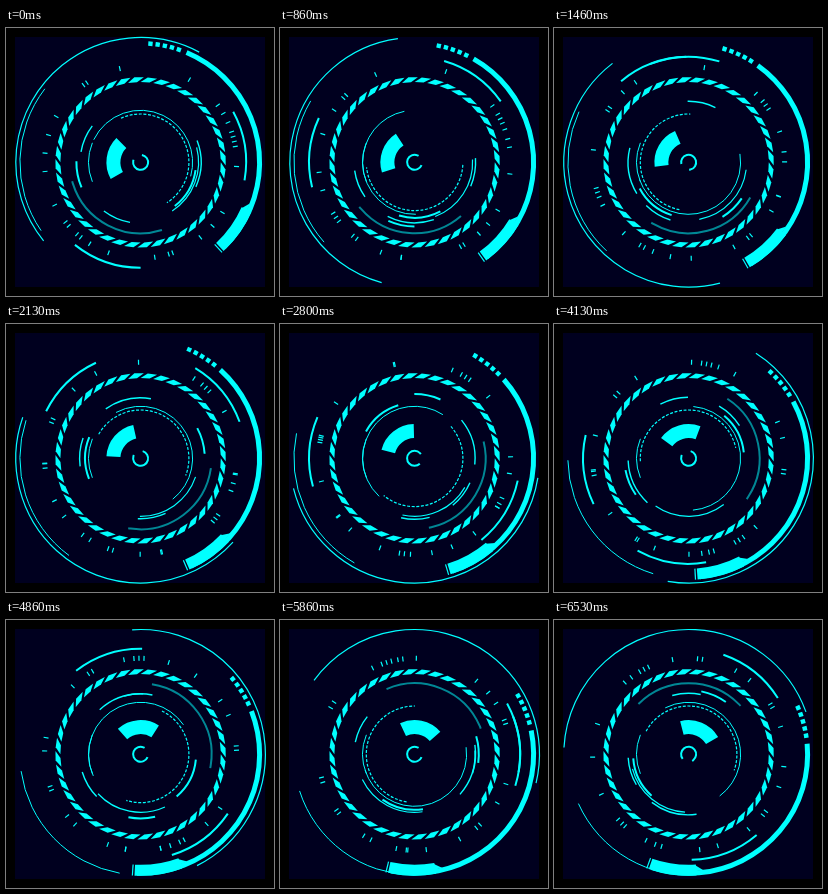
Write an HTML page with a canvas that moves like this. It is 268 px wide and 268 px high and loops after 6.6 s.

```html
<!DOCTYPE html>
<html lang="en">
<head>
<meta charset="utf-8">
<title>HUD dial</title>
<style>
html, body { margin: 0; width: 100%; height: 100%; overflow: hidden; background: #000; }
canvas { display: block; width: 268px; height: 268px; }
</style>
</head>
<body>
<canvas id="dial"></canvas>
<script>
const SIZE = 268, LOOP = 6600, CX = 134.6, CY = 134.3;
const CYAN = '#00ffff', DIM = '#008795', NAVY = '#00001f';
const canvas = document.getElementById('dial');
const ctx = canvas.getContext('2d');
const ratio = window.devicePixelRatio || 1;
canvas.width = canvas.height = SIZE * ratio;

const rad = deg => deg * Math.PI / 180;

// radius, line width, start angle, span, degrees per second
const arcs = [
  { r: 124.8, w: 1.2, from: 141, span: 157, speed: -49.8 },
  { r: 120.7, w: 1, from: 145.5, span: 72, speed: -9.65 },
  { r: 105.5, w: 2, from: 90, span: 38.5, speed: 106.5 },
  { r: 105.5, w: 2, from: -28.6, span: 38.5, speed: -63 },
  { r: 71, w: 2, from: 72.5, span: 92, speed: -32.5, color: DIM },
  { r: 64.2, w: 2, from: 157, span: 24, speed: -93.3 },
  { r: 60.5, w: 1.4, from: 190, span: 27, speed: -62.7 },
  { r: 60.5, w: 1.4, from: -21, span: 45, speed: 129 },
  { r: 61, w: 1.4, from: 100, span: 27, speed: -145 },
  { r: 58, w: 1.2, from: -15, span: 72, speed: 17 },
  { r: 55.5, w: 2, from: 8, span: 44, speed: 75.8 },
  { r: 52, w: 1, from: 205.7, span: 170, speed: -163.3 },
  { r: 52, w: 1, from: 158, span: 44, speed: 0 },
  { r: 48.3, w: 1.2, from: 246, span: 171, speed: 163.3, dash: [3, 1.6] },
  { r: 27.2, w: 14, from: 151, span: 74, speed: 16.4 },
  { r: 7.5, w: 2, from: -80, span: 280, speed: -360 }
];

// Two sets of marks that turn against each other
const marks = [
  { speed: -16, at: [300.5, 335.5, 341.5, 344.5, 347.5, 2.5, 41.5, 51.5, 70.5, 73, 109.5,
    122, 138.5, 141.5, 153.5, 174.5, 185.5, 208.5, 233.5, 236, 257.5] },
  { speed: 23, at: [128.5, 131.5, 196.5, 323.5, 329.5, 350.5, 31.5, 81.5] }
];

function arc({ r, w, from, span, dash = [], color = CYAN }, turn = 0) {
  ctx.strokeStyle = color;
  ctx.lineWidth = w;
  ctx.setLineDash(dash);
  ctx.beginPath();
  ctx.arc(0, 0, r, rad(from + turn), rad(from + turn + span));
  ctx.stroke();
  ctx.setLineDash([]);
}

// Each corner is [radius, angle]
function poly(...corners) {
  ctx.beginPath();
  for (const [r, a] of corners) ctx.lineTo(r * Math.cos(rad(a)), r * Math.sin(rad(a)));
  ctx.fill();
}

function spoke(inner, outer, angle, w) {
  const c = Math.cos(rad(angle)), s = Math.sin(rad(angle));
  ctx.strokeStyle = CYAN;
  ctx.lineWidth = w;
  ctx.beginPath();
  ctx.moveTo(inner * c, inner * s);
  ctx.lineTo(outer * c, outer * s);
  ctx.stroke();
}

function ropeRing() {
  const count = 40, step = 360 / count;
  for (let i = 0; i < count; i++) {
    const a = i * step;
    poly([80.2, a], [80.2, a + 6.4], [85.2, a + 11.2], [85.2, a + 4.8]);
  }
}

function bezel(turn) {
  for (let i = 0; i < 5; i++) arc({ r: 119, w: 4.5, from: -86.3 + 3.5 * i, span: 2.1 }, turn);
  arc({ r: 119, w: 5, from: -67.3, span: 113 }, turn);
  poly([117, 20.5 + turn], [111, 24.5 + turn], [117, 25 + turn]);
  arc({ r: 116, w: 11, from: 24, span: 22.9 }, turn);
  spoke(110.5, 121.5, 47.9 + turn, 1.2);
}

// The turn picks up speed during the first 0.3 s
const ramp = s => s < 0.3 ? s * s / 0.6 : s - 0.15;

function draw(ms) {
  // 15 pictures a second, held on a 10 ms grid
  const n = Math.ceil((Math.floor((ms % LOOP) / 10) + 1) * 0.15 - 1e-9) - 1;
  const u = ramp(n / 15);
  ctx.setTransform(ratio, 0, 0, ratio, 0, 0);
  ctx.fillStyle = '#000';
  ctx.fillRect(0, 0, SIZE, SIZE);
  ctx.fillStyle = NAVY;
  ctx.fillRect(9, 9, 250, 250);
  ctx.translate(CX, CY);
  ctx.fillStyle = CYAN;
  for (const a of arcs) arc(a, a.speed * u);
  for (const { speed, at } of marks) {
    for (const a of at) spoke(93.5, 98.5, a + speed * u, 1.2);
  }
  ropeRing();
  bezel(9.75 * u);
}

const begin = performance.now();
function loop() {
  draw(performance.now() - begin);
  requestAnimationFrame(loop);
}
loop();
</script>
</body>
</html>
```
